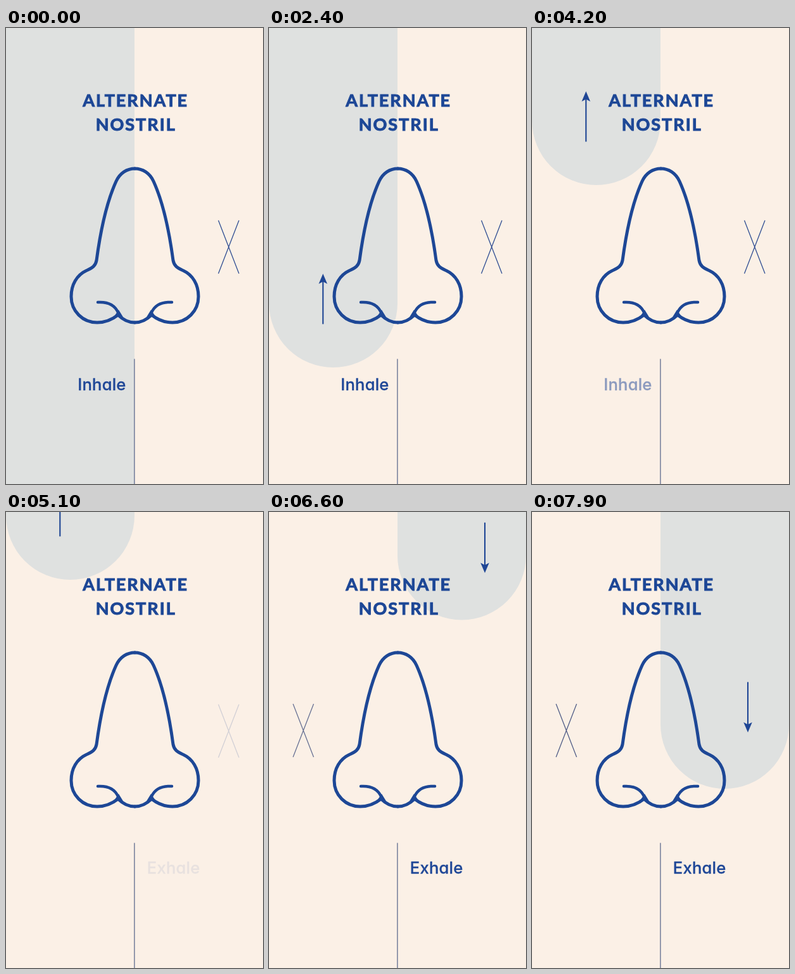
These frames come from a looping animation (406 px wide and 720 px high, 8000 ms). An HTML page:

```html
<!DOCTYPE html>
<html lang="en">
<head>
<meta charset="utf-8">
<title>Alternate nostril breathing</title>
<style>
  html, body { margin: 0; width: 100%; height: 100%; overflow: hidden; background: #fbf0e6; }
  svg { display: block; width: 100%; height: 100%; }
  .air { fill: #dfe1e0; }
  .title {
    font: bold 27px Lato, "Open Sans", sans-serif;
    letter-spacing: 2px; fill: #1d4796; stroke: #1d4796; stroke-width: 1;
  }
  .label {
    font: 500 25.6px Inter, "Open Sans", sans-serif;
    font-feature-settings: "cv11"; /* single-storey a */
    letter-spacing: .2px;
    fill: #1f4797; stroke: #1f4797; stroke-width: .3; stroke-linejoin: round;
  }
  .nose { fill: none; stroke: #1d4796; stroke-width: 5; stroke-linecap: round; stroke-linejoin: round; }
  .thin { fill: none; stroke-width: 1.25; }
</style>
</head>
<body>
<svg viewBox="0 0 406 720" preserveAspectRatio="none">
  <defs>
    <path id="air" d="M-101.5 -1000 V-101.5 A101.5 101.5 0 0 0 101.5 -101.5 V-1000 Z"/>
    <path id="cross" class="thin" d="M0 0 L32.5 84 M32.5 0 L0 84"/>
    <g id="arrow">
      <path d="M0 10 V79.5" stroke="#1f4695" stroke-width="2.1"/>
      <path d="M0 0 L6.8 16 L0 12.5 L-6.8 16 Z" fill="#1f4695"/>
    </g>
    <g id="half">
      <path class="nose" d="M203.5 222 C191 222 180 229 174 242 C158 277 149 322 143 367
        C141 377 135 379 127 383 C112 390 103 405 103 424 C103 447 121 465 144 465
        C157 465 167 461 177 453 C185 461 193 465 203.5 465"/>
      <path class="nose" style="stroke-width:4.5" d="M145 433 C161 432 172 438 177 449"/>
      <path d="M178 445 L186 458 L177 456 L169 458 Z" fill="#1d4796"/>
    </g>
  </defs>

  <use href="#air" id="airIn" class="air"/>
  <use href="#air" id="airOut" class="air"/>
  <path class="thin" d="M202.9 522.5 V720" stroke="#56648a"/>
  <use href="#cross" id="crossRight" x="335.5" y="303.7" stroke="#2b4a91"/>
  <use href="#cross" id="crossLeft" x="38" y="303" stroke="#4d5a85"/>
  <use href="#arrow" id="arrowIn"/>
  <use href="#arrow" id="arrowOut"/>

  <text class="title" x="204.7" y="124" text-anchor="middle">ALTERNATE</text>
  <text class="title" x="205.2" y="161.5" text-anchor="middle">NOSTRIL</text>
  <use href="#half"/>
  <use href="#half" transform="translate(407 0) scale(-1 1)"/>

  <text id="inhale" class="label" x="113.3" y="571.7">Inhale</text>
  <text id="exhale" class="label" x="222.8" y="571">Exhale</text>
</svg>
<script>
  const LOOP = 8000, STEP = 100;
  const el = id => document.getElementById(id);

  // Tables of [time, value], linear in between.
  const airInY = [[0, 912], [1500, 677], [3300, 395], [4200, 248], [5400, 60], [5800, -4]];
  const airOutY = [[5700, -8], [6000, 51], [7100, 270], [7900, 437]];
  const arrowOutY = [[6000, -20], [7100, 193], [7900, 348]];
  const fades = {
    inhale: [[3700, 1], [4700, 0]],
    crossRight: [[4300, 1], [5300, 0]],
    exhale: [[5000, 0], [6200, 1]],
    crossLeft: [[5300, 0], [6800, 1]]
  };

  function at(table, t) {
    if (t <= table[0][0]) return table[0][1];
    for (let i = 1; i < table.length; i++) {
      const [t0, v0] = table[i - 1], [t1, v1] = table[i];
      if (t <= t1) return v0 + (v1 - v0) * (t - t0) / (t1 - t0);
    }
    return table[table.length - 1][1];
  }

  function place(id, x, y, extra = "") {
    el(id).setAttribute("transform", `translate(${x} ${y}) ${extra}`);
  }

  function draw(t) {
    const inY = at(airInY, t);
    place("airIn", 101.5, inY);
    place("arrowIn", 85.3, inY - 148);
    place("airOut", 304.5, at(airOutY, t));
    place("arrowOut", 341, at(arrowOutY, t), "scale(1 -1)");
    for (const id in fades) el(id).style.opacity = at(fades[id], t);
  }

  const start = performance.now();
  function tick() {
    const t = (performance.now() - start) % LOOP;
    draw(Math.floor(t / STEP) * STEP);
    requestAnimationFrame(tick);
  }
  tick();
</script>
</body>
</html>
```
